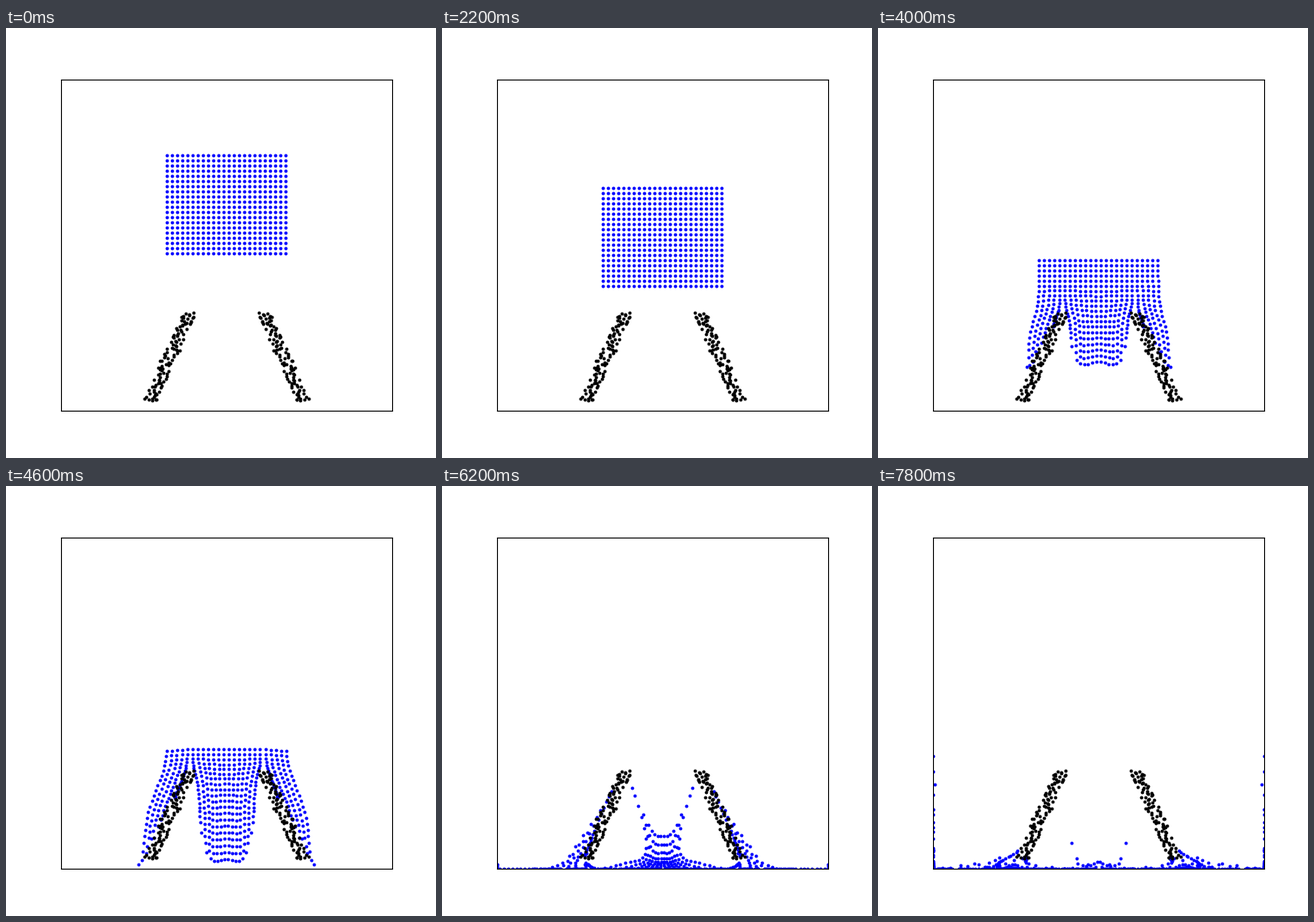
Recreate the animation shown at these times as a matplotlib script. Size 500 by 500 pixels, loop 8000 ms.

```python
import numpy as np
import matplotlib.pyplot as plt
from matplotlib.animation import FuncAnimation

FRAMES, SUBSTEPS = 40, 20
SIDE = 385.0                 # box side in pixels
CELLS, PAD = 64, 4
DX = SIDE / CELLS
NODES = CELLS + 2 * PAD + 1
DT = 1 / SUBSTEPS
GRAVITY = 0.583              # pixels per frame squared
SOUND = 17.0
RELAX = 0.25                 # share of the squeeze forgotten per frame
TENSION = 0.15
TIP, BASE = np.array([148.5, 112.0]), np.array([104.0, 13.0])
REACH = 7.5
FRICTION = 0.1
DOT = 3.2


def mirror(p):
    return np.column_stack([SIDE - p[:, 0], p[:, 1]])


def leg_points():
    """Scattered dots of the left leg."""
    rng = np.random.default_rng(7)
    edge = np.array([
        (154.7, 114), (149.5, 112), (154.2, 109), (145, 113.5), (140, 109),
        (150, 101), (143, 104), (151, 103), (135.5, 94), (135.5, 88),
        (128, 80), (138, 70), (123, 72), (121, 64), (115.5, 58),
        (123, 43), (113, 50), (108, 36), (106, 28), (97, 14),
        (99.5, 16), (102, 13.5), (106.5, 12), (110.5, 13), (110, 20)])
    t = (np.arange(78) + rng.uniform(0, 1, 78)) / 78
    fill = TIP + t[:, None] * (BASE - TIP)
    fill[:, 0] += rng.uniform(-7.5, 7.5, 78)
    return np.vstack([edge, fill])


def block():
    step = SIDE / 64
    gx, gy = np.meshgrid(SIDE / 2 + (np.arange(24) - 11.5) * step,
                         (np.arange(20) + 30.45) * step)
    return np.column_stack([gx.ravel(), gy.ravel()])


def leg_contact(nodes):
    """Distance to the left leg and outward unit normals."""
    axis = BASE - TIP
    t = np.clip((nodes - TIP) @ axis / (axis @ axis), 0, 1)
    gap = nodes - (TIP + t[:, None] * axis)
    dist = np.hypot(gap[:, 0], gap[:, 1])
    return dist, gap / np.maximum(dist, 1e-6)[:, None]


ii, jj = np.divmod(np.arange(NODES * NODES), NODES)
GRID = np.column_stack([ii - PAD, jj - PAD]) * DX
CONTACTS = []
for side in (1, -1):
    dist, normal = leg_contact(GRID if side == 1 else mirror(GRID))
    near = np.flatnonzero(dist < REACH)
    CONTACTS.append((near, normal[near] * (side, 1)))
LEFT, RIGHT = GRID[:, 0] < -1, GRID[:, 0] > SIDE + 1
FLOOR = GRID[:, 1] < -1
OFFSETS = np.array([(a, b) for a in range(3) for b in range(3)])


def bound(v):
    """Apply legs, walls and floor to the grid velocities."""
    for near, n in CONTACTS:
        u = v[near]
        vn = np.minimum((u * n).sum(1), 0)[:, None]
        u = u - vn * n
        speed = np.maximum(np.hypot(u[:, 0], u[:, 1]), 1e-9)[:, None]
        v[near] = u * np.maximum(1 + FRICTION * vn / speed, 0)
    v[LEFT, 0] = np.maximum(v[LEFT, 0], 0)
    v[RIGHT, 0] = np.minimum(v[RIGHT, 0], 0)
    v[FLOOR, 1] = np.maximum(v[FLOOR, 1], 0)


def substep(x, v, C, J):
    base = np.floor(x / DX - 0.5).astype(int)
    f = x / DX - base
    w = np.array([0.5 * (1.5 - f) ** 2, 0.75 - (f - 1) ** 2,
                  0.5 * (f - 0.5) ** 2])
    weight = w[OFFSETS[:, 0], :, 0] * w[OFFSETS[:, 1], :, 1]
    d = (OFFSETS[:, None] - f) * DX
    node = base + OFFSETS[:, None] + PAD
    idx = node[..., 0] * NODES + node[..., 1]

    # particles to grid
    push = -4 * DT * SOUND ** 2 * np.minimum(J - 1, TENSION) * J / DX ** 2
    affine = C + push[:, None, None] * np.eye(2)
    mom = weight[..., None] * (v + np.einsum('nij,knj->kni', affine, d))
    flat = idx.ravel()
    mass = np.bincount(flat, weight.ravel(), NODES ** 2)
    gv = np.column_stack([np.bincount(flat, mom[..., k].ravel(), NODES ** 2)
                          for k in (0, 1)])
    gv /= np.maximum(mass, 1e-9)[:, None]
    gv[:, 1] -= GRAVITY * DT
    bound(gv)

    # grid to particles
    got = gv[idx] * weight[..., None]
    v = got.sum(0)
    C = 4 / DX ** 2 * np.einsum('kni,knj->nij', got, d)
    J = J * (1 + DT * np.trace(C, axis1=1, axis2=2))
    J = np.clip(J + RELAX * DT * (1 - J), 0.3, 2)
    x = np.clip(x + DT * v, 0, SIDE)
    return x, v, C, J


def simulate():
    x = block()
    v = np.tile([0.0, -0.28], (len(x), 1))
    C, J = np.zeros((len(x), 2, 2)), np.ones(len(x))
    path = [x]
    for _ in range(FRAMES - 1):
        for _ in range(SUBSTEPS):
            x, v, C, J = substep(x, v, C, J)
        path.append(x)
    return path


path = simulate()
leg = leg_points()
legs = np.vstack([leg, mirror(leg)])

fig, ax = plt.subplots(figsize=(5, 5), dpi=100)
ax.set(xlim=(0, SIDE), ylim=(0, SIDE), xticks=[], yticks=[], aspect='equal')
fluid = ax.scatter(path[0][:, 0], path[0][:, 1], s=DOT, c='blue')
ax.scatter(legs[:, 0], legs[:, 1], s=DOT, c='black')


def draw(n):
    fluid.set_offsets(path[n])
    return fluid,


anim = FuncAnimation(fig, draw, frames=FRAMES, interval=200, repeat=True)
plt.show()
```
